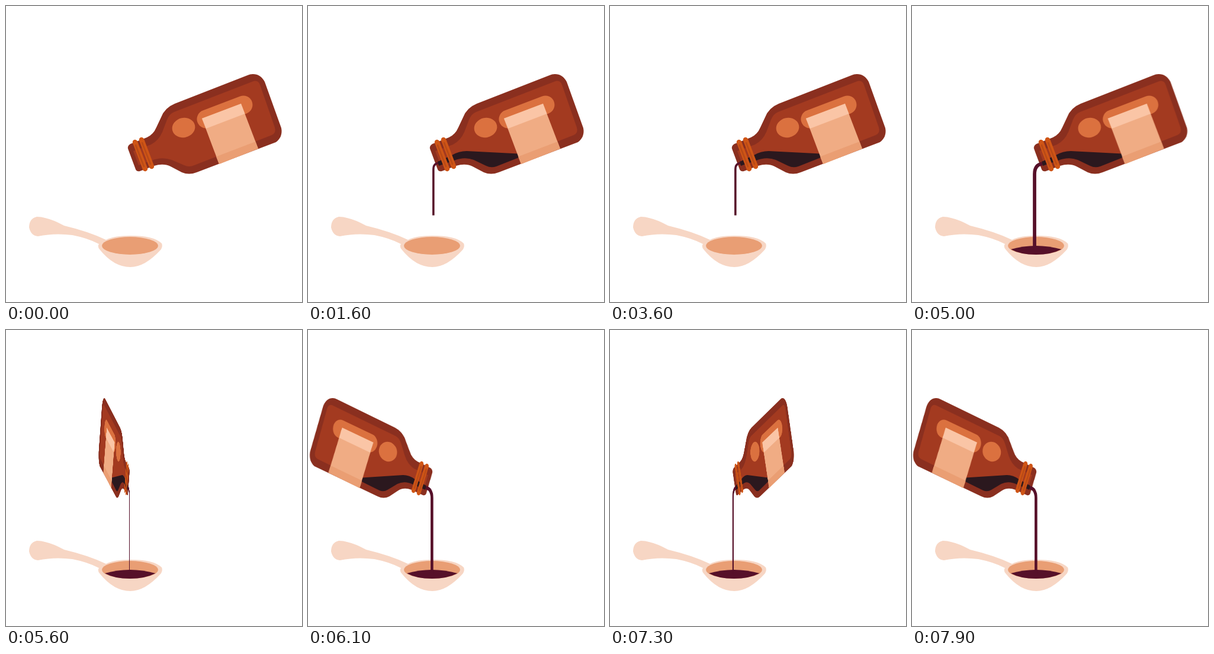
Write an HTML page that moves like this. It is 500x500 px and loops after 8 s.

```html
<!DOCTYPE html>
<html lang="en">
<head>
<meta charset="utf-8">
<title>Medicine and spoon</title>
<style>
  html, body { margin: 0; width: 100%; height: 100%; overflow: hidden; background: #fff; }
  svg { display: block; width: 100vw; height: 100vh; }

  .bottle, .syrup, .stream, .dose { animation: 8s linear infinite; }
  .bottle { transform-origin: 208.3px 0; animation-name: flip; }
  .syrup  { transform-origin: 390px 254px; animation-name: gather; }
  .stream { transform-origin: 219px 264px; animation-name: pour; }
  .dose   { transform-origin: 206.5px 427.5px; animation-name: fill; }

  /* One second is 12.5% of the loop */
  @keyframes gather {
    0% { transform: scale(0); }
    12.5%, 100% { transform: scale(1); }
  }
  @keyframes pour {
    0%, 12.5%, 37.5% { transform: scale(0); }
    25%, 50%, 100% { transform: scale(1); }
  }
  @keyframes fill {
    0%, 50% { transform: scale(0); }
    62.5%, 100% { transform: scale(1); }
  }
  @keyframes flip {
    0%, 62.5%, 87.5% { transform: scaleX(1); }
    75%, 100% { transform: scaleX(-1); }
  }
</style>
</head>
<body>
<svg viewBox="0 0 500 500">
  <g class="spoon">
    <path fill="#f7d6c4" d="M52 356 Q39 359 39 374 Q42 388 54 389 Q82 383 112 387 Q138 392 157 402
      Q154 406 158 411 Q182 441 210 441 Q235 441 262 411 Q265 405 263 401 Q250 388 210 388
      Q182 388 169 395 Q140 381 98 371 Q80 361 66 358 Q60 356 52 356Z"/>
    <ellipse cx="209.5" cy="405" rx="47.5" ry="15" fill="#e99e74"/>
    <path class="dose" fill="#561029" d="M167 411 Q209 399 252.5 411 Q235 420 209.5 420 Q183 420 167 411Z"/>
  </g>

  <g class="bottle">
    <path fill="#8a2f1f" d="M417 115 Q430 115 437 128 L465 206 Q468 221 456 230 L322 281
      Q309 286 297 281 L278 271 Q266 265 250 270 L226 279 Q221 280 219 276 L206 241
      Q205 236 210 233 L238 222 Q249 217 254 205 L262 188 Q268 172 285 165 L408 117 Q412 115 417 115Z"/>
    <path fill="#a33a20" d="M418 127 Q426 125 429 133 L454 205 Q457 214 449 218 L318 269
      Q309 273 301 269 L280 260 Q263 254 246 261 L224 269 L215 245 L245 234
      Q258 227 264 213 L272 192 Q276 182 284 179Z"/>
    <ellipse cx="300" cy="205.5" rx="19.5" ry="16.5" fill="#db713f" transform="rotate(-12 300 205.5)"/>
    <path d="M338 191 L401 167" stroke="#db713f" stroke-width="31" stroke-linecap="round"/>

    <path class="syrup" fill="#2b181e" d="M219 263 L243 252 Q255 245 268 245 L356 249.500 L375 251
      L356 256 L318 271 Q309 274 301 270 L280 260 Q264 254 247 261 L221 270Z"/>

    <g class="label">
      <path fill="#f0ac84" d="M331 190 L397 165 L426 241 L360 267Z"/>
      <path fill="#fac5a6" d="M331 190 L397 165 L403.500 182 L338 207Z"/>
      <path fill="#ea9e73" d="M355 254.500 L421.500 229 L426 241 L360 267Z"/>
    </g>

    <path class="stream" fill="none" stroke="#561029" stroke-width="5.8" d="M220 266.500 Q207 268 207 284 V413"/>

    <g class="rings" fill="none" stroke-linecap="round">
      <path stroke="#cf5516" stroke-width="8.500" d="M218 230 L235 275 M229 226 L246 271"/>
      <path stroke="#b84a17" stroke-width="2.500" d="M219 235 L233 271 M230 231 L244 267"/>
    </g>
  </g>
</svg>
</body>
</html>
```
